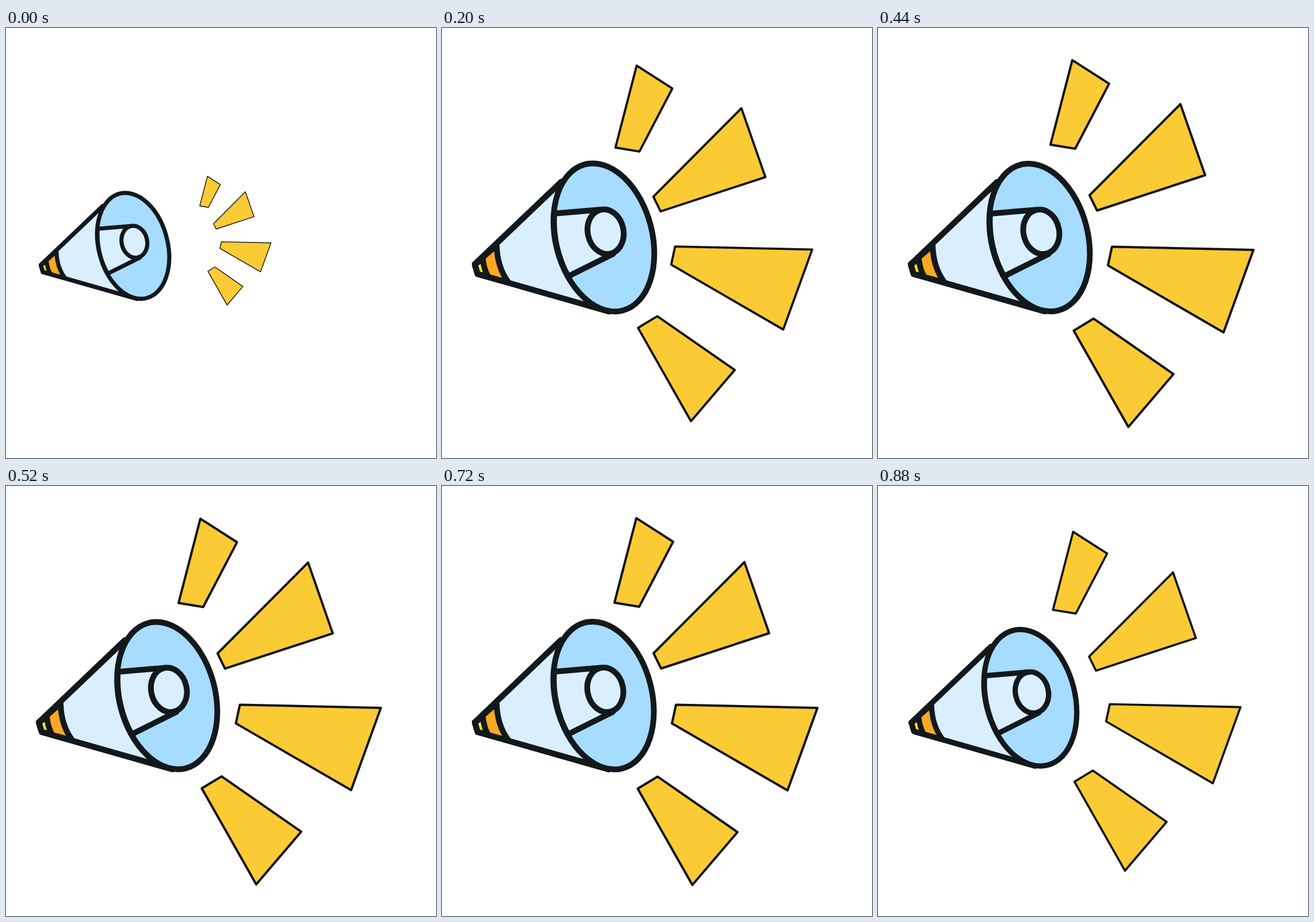
These frames come from a looping animation (748x748 px, 1040 ms). An HTML page:

```html
<!DOCTYPE html>
<html lang="en">
<head>
<meta charset="utf-8">
<title>Megaphone</title>
<style>
  html, body { margin: 0; width: 100%; height: 100%; overflow: hidden; background: #fff; }
  svg { display: block; width: 100%; height: 100%; }
</style>
</head>
<body>
<svg viewBox="0 0 748 748" stroke-linejoin="round" stroke-linecap="round">
  <g id="rays" fill="#facb34" stroke="#111" stroke-width="4">
    <path d="M338 56L402 97L343 210L300 203Z"/>
    <path d="M526 132.500L569 256L381 317.500L368 291Z"/>
    <path d="M407 380.500L653 386L601 529.500L400 413Z"/>
    <path d="M375 505.500L514 602L435.500 694L340.500 526.500Z"/>
  </g>
  <g id="horn" fill="#d9efff" stroke="#12181c" stroke-width="10">
    <path d="M57 411L207 268L290 493L62 428Z"/>
    <path d="M57 411L95 378Q96 417 116 443L62 428Z" fill="#fba823"/>
    <path d="M57 411L71 402Q73 420 80 432L62 428Z" fill="#fbe51a"/>
    <path d="M57 411L207 268M290 493L62 428L57 411" fill="none"/>
    <ellipse rx="83.800" ry="130.900" transform="translate(281 364.500) rotate(-14.400)" fill="#a6dcff"/>
    <path d="M278 316L195 323A83.800 130.900 -14.400 0 0 219 432L297 393"/>
    <ellipse rx="31" ry="39" transform="translate(284 354.500) rotate(-12)"/>
  </g>
</svg>
<script>
  const LOOP = 1040, STEP = 40, END = 880;
  const REST = 0.924, SWELL = 0.1;
  const ENTER = 280, PULSE_START = 36, RISE = 171, FALL = 109;

  const rays = document.getElementById('rays');
  const horn = document.getElementById('horn');

  const easeSine = u => (1 - Math.cos(Math.PI * u)) / 2;

  // Repeating beat: slower swell, quicker release.
  function pulse(t) {
    if (t < PULSE_START) return 1;
    const p = (t - PULSE_START) % (RISE + FALL);
    const u = p < RISE ? p / RISE : 1 - (p - RISE) / FALL;
    return 1 + SWELL * easeSine(u);
  }

  function enter(t, from, power) {
    const left = Math.max(0, 1 - t / ENTER);
    return 1 - (1 - from) * left ** power;
  }

  function scaleAbout(el, x, y, k) {
    el.setAttribute('transform', `translate(${x} ${y}) scale(${k}) translate(${-x} ${-y})`);
  }

  function draw(ms) {
    const t = Math.min(END, Math.floor((ms % LOOP) / STEP) * STEP);
    const size = REST * pulse(t);
    scaleAbout(rays, 357.1, 367.2, size * enter(t, 0.38, 2.08));
    scaleAbout(horn, 69.6, 415.7, size * enter(t, 0.776, 2.27));
  }

  let start = null;
  function tick(now) {
    if (start === null) start = now;
    draw(Math.max(0, now - start));
    requestAnimationFrame(tick);
  }
  draw(0);
  requestAnimationFrame(tick);
</script>
</body>
</html>
```
